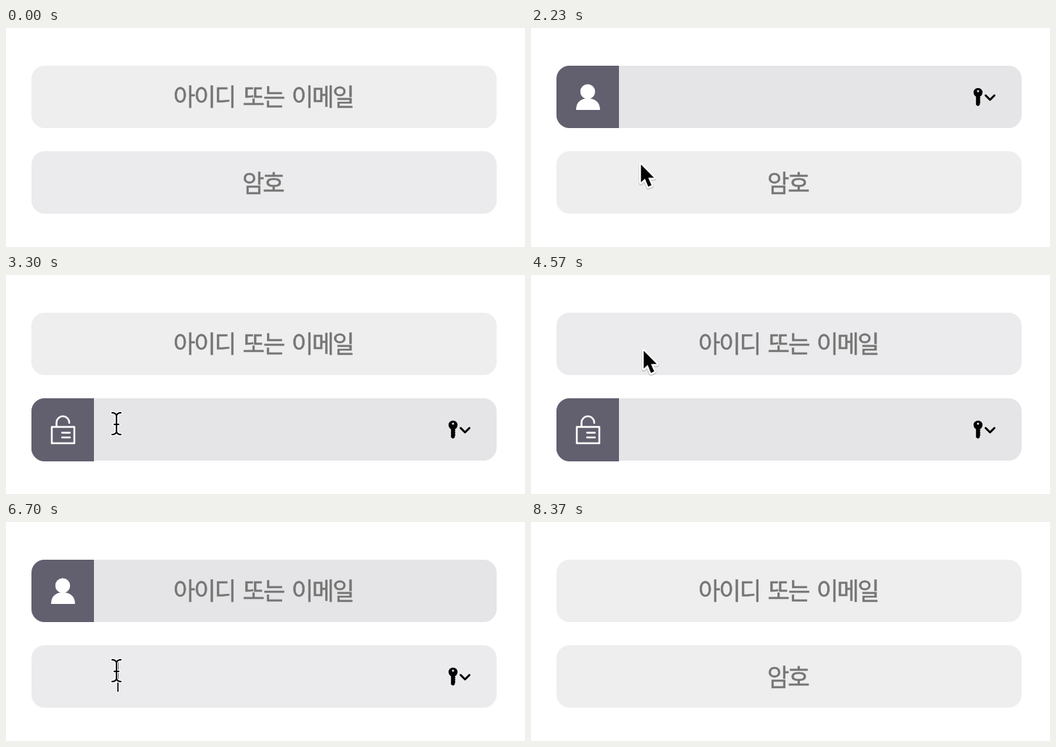
Recreate the animation shown at these times as an HTML page. Size 714x302 px, loop 9610 ms.

```html
<!DOCTYPE html>
<html lang="ko">
<head>
<meta charset="utf-8">
<title>Login fields</title>
<style>
  html, body { margin: 0; width: 100%; height: 100%; overflow: hidden; background: #fff; }
  svg { display: block; width: 714px; height: 302px; }
  text {
    font: 400 33px "Noto Sans CJK KR", "Noto Sans CJK", "Noto Sans KR", sans-serif;
    letter-spacing: -2.1px; word-spacing: 3.4px;
    fill: #757575; stroke: #757575; stroke-width: .5px;
  }
  .line { fill: none; stroke-linecap: round; stroke-linejoin: round; }
</style>
</head>
<body>
<svg viewBox="0 0 714 302">
  <defs>
    <g id="key">
      <circle cx="615" cy="37" r="6.2"/>
      <path d="M612.2 40h5.2v3l1 1.5-1 1.5 1 1.5-1 1.5 1 1.5-1 1.5v2l-2.4 1.7-2.8-1.7z"/>
      <circle cx="615" cy="35" r="1.5" fill="#e5e5e7"/>
      <path class="line" d="M625.5 41l6 6 6-6" stroke="#000" stroke-width="2.8"/>
    </g>
    <path id="tab" d="M53 0H121V86H53A18 18 0 0 1 35 68V18A18 18 0 0 1 53 0Z" fill="#62606f"/>
    <path id="pointer" d="M0 1.5V26L5.5 21 10 32 14.5 30 10 19.8H18Z"/>
    <path id="beam" class="line" d="M-6 -15Q-1 -15 0 -11Q1 -15 6 -15M0 -11V11M-6 15Q-1 15 0 11Q1 15 6 15M-3 1H3"/>
  </defs>

  <g id="user" transform="translate(0 52)">
    <rect class="bg" x="35" width="640" height="86" rx="18"/>
    <text class="hint" x="230.3" y="55">아이디 또는 이메일</text>
    <g class="icon">
      <use href="#tab"/>
      <circle cx="78" cy="35.8" r="10.2" fill="#fff"/>
      <path d="M62 61C62 50 69 45 78.3 45S95 50 95 61Z" fill="#fff"/>
    </g>
    <use class="key" href="#key"/>
    <rect class="caret" x="153.2" y="22" width="1.6" height="42"/>
  </g>

  <g id="pass" transform="translate(0 170)">
    <rect class="bg" x="35" width="640" height="86" rx="18"/>
    <text class="hint" x="325.1" y="55.5">암호</text>
    <g class="icon">
      <use href="#tab" y="1"/>
      <use href="#tab"/>
      <g class="line" stroke="#fff" stroke-width="2.5">
        <path d="M63 39.5H94V62H63ZM69.5 39V33.5A8.7 8.7 0 0 1 87 33.5V34"/>
        <path d="M77 47.5H88M77 54H88" stroke-width="2.3"/>
      </g>
    </g>
    <use class="key" href="#key"/>
    <rect class="caret" x="153.2" y="22" width="1.6" height="42"/>
  </g>

  <g id="cursor">
    <g class="arrow">
      <use href="#pointer" y="1.5" fill="#000" stroke="#000" stroke-width="6" stroke-linejoin="round" opacity=".12"/>
      <use href="#pointer" fill="#fff" stroke="#fff" stroke-width="4.5" stroke-linejoin="round"/>
      <use href="#pointer"/>
    </g>
    <g class="ibeam">
      <use href="#beam" stroke="#fff" stroke-width="4.6"/>
      <use href="#beam" stroke="#000" stroke-width="2.1"/>
    </g>
  </g>
</svg>
<script>
const LOOP = 9610;
const $ = (sel, root = document) => root.querySelector(sel);
const show = (el, on) => el.setAttribute('visibility', on ? 'visible' : 'hidden');
const clamp = v => Math.min(1, Math.max(0, v));
const smooth = v => v * v * (3 - 2 * v);
const inOut = v => v < .5 ? 4 * v ** 3 : 1 - 4 * (1 - v) ** 3;
const outQuad = v => 1 - (1 - v) ** 2;
const mix = (a, b, k) => a.map((v, i) => v + (b[i] - v) * k);

const IDLE = [238, 238, 238], HOVER = [235, 235, 237], FOCUS = [229, 229, 231];

// focus: [start, end, caret blink start]; hover: [start, end]
const fields = [
  { id: 'user', top: 52, focus: [[1300, 2830, 1300], [4770, 6700, 4770]],
    hover: [[840, 1960], [4330, 6230]] },
  { id: 'pass', top: 170, focus: [[2830, 4770, 2800], [6700, 8030, 6700]],
    hover: [[-1000, 600], [2210, 4250], [6330, 7650]] }
];
for (const f of fields) {
  const root = $('#' + f.id);
  for (const part of ['bg', 'hint', 'icon', 'key', 'caret']) f[part] = $('.' + part, root);
}

// cursor legs: start, end, from, to, easing
const legs = [
  [600, 970, [128, -8], [148, 104], outQuad],
  [1800, 2470, [148, 104], [152, 205], inOut],
  [4030, 4570, [152, 205], [155, 103], inOut],
  [4770, 4800, [155, 103], [155, 105], smooth],
  [6030, 6500, [155, 105], [152, 205], inOut],
  [6700, 6930, [152, 205], [151, 207], smooth],
  [7330, 7770, [151, 207], [151, 307], v => v ** 2.33]
];

const active = (ranges, t) => ranges.find(([a, b]) => t >= a && t < b);
const level = (ranges, t, ms) => Math.max(...ranges.map(([a, b]) =>
  smooth(clamp((t - a) / ms)) * (1 - smooth(clamp((t - b) / ms)))));

function cursorAt(t) {
  const leg = legs.filter(l => t >= l[0]).pop();
  if (!leg) return null;
  const [a, b, from, to, ease] = leg;
  return mix(from, to, ease(clamp((t - a) / (b - a))));
}

const cursor = $('#cursor'), arrow = $('.arrow'), ibeam = $('.ibeam');

function draw(t) {
  const pos = cursorAt(t);
  let overText = false;
  for (const f of fields) {
    const focus = active(f.focus, t);
    const lit = level(f.focus, t, 220);
    const base = mix(IDLE, HOVER, level(f.hover, t, 200));
    f.bg.setAttribute('fill', `rgb(${mix(base, FOCUS, lit).map(Math.round)})`);
    f.icon.setAttribute('opacity', lit);
    show(f.hint, !focus);
    show(f.key, focus);
    show(f.caret, focus && (t - focus[2]) % 1000 < 500);
    if (focus && pos && pos[1] >= f.top && pos[1] < f.top + 86) overText = true;
  }
  const visible = pos && t < 7770;
  show(arrow, visible && !overText);
  show(ibeam, visible && overText);
  if (pos) cursor.setAttribute('transform', `translate(${pos})`);
}

function tick() {
  draw(performance.now() % LOOP);
  requestAnimationFrame(tick);
}
tick();
</script>
</body>
</html>
```
